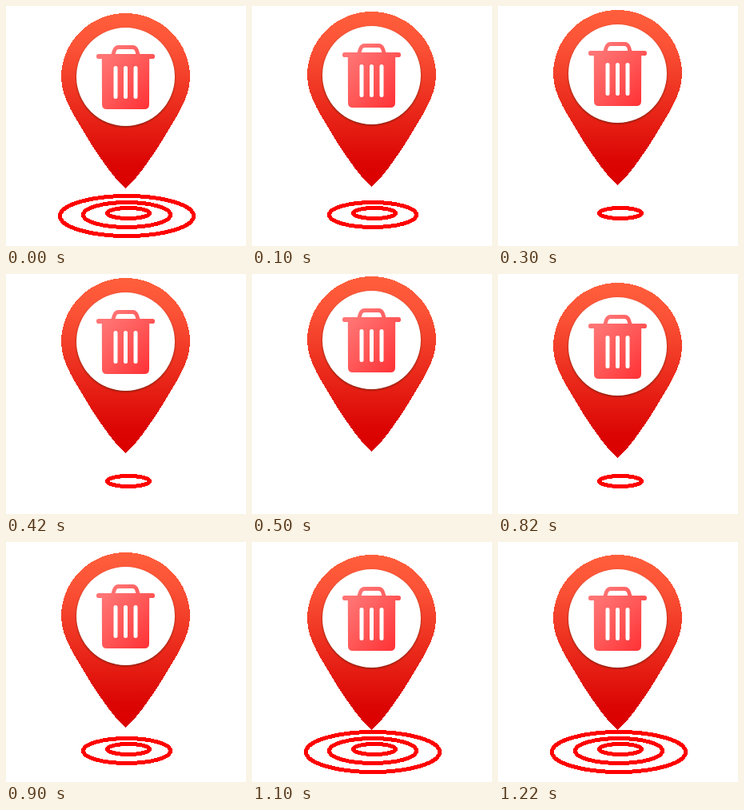
Write an HTML page that moves like this. It is 300x300 px and loops after 1300 ms.

```html
<!DOCTYPE html>
<html lang="en">
<head>
<meta charset="utf-8">
<title>Bin location pin</title>
<style>
  html, body { margin: 0; width: 100%; height: 100%; overflow: hidden; background: #fff; }
  svg { display: block; width: 300px; height: 300px; }
  .ring { fill: none; stroke: #f00; stroke-width: 5; shape-rendering: crispEdges; }
</style>
</head>
<body>
<svg viewBox="0 0 300 300">
  <defs>
    <linearGradient id="red" x1="0" y1="0" x2="0" y2="1">
      <stop offset="0" stop-color="#ff5f3c"/>
      <stop offset=".2" stop-color="#fb5236"/>
      <stop offset=".87" stop-color="#db0503"/>
      <stop offset="1" stop-color="#dc0000"/>
    </linearGradient>
    <linearGradient id="pink" gradientUnits="userSpaceOnUse" x1="116" y1="72" x2="176" y2="126">
      <stop offset="0" stop-color="#ff7474"/>
      <stop offset=".5" stop-color="#ff5757"/>
      <stop offset="1" stop-color="#ff3438"/>
    </linearGradient>
    <filter id="soft" x="-10%" y="-10%" width="120%" height="120%">
      <feGaussianBlur stdDeviation="1.2"/>
    </filter>
  </defs>

  <ellipse class="ring" cx="151" cy="262.5" rx="83.5" ry="25"/>
  <ellipse class="ring" cx="151" cy="261" rx="54.5" ry="15.5"/>
  <ellipse class="ring" cx="153" cy="259" rx="26.5" ry="6.5"/>

  <g id="pin">
    <path fill="url(#red)" shape-rendering="crispEdges"
      d="M149.5 9C194 9 230 45 230 89C230 116 211 141 193.500 171C178 195 164 215 151 227Q149.500 228.500 148 227C135 215 121 195 105.500 171C88 141 69 116 69 89C69 45 105 9 149.500 9Z"/>
    <circle cx="149.500" cy="89.700" r="61.500" fill="#6b2410" opacity=".8" filter="url(#soft)"/>
    <circle cx="149.500" cy="88.500" r="61.500" fill="#fff"/>
    <path d="M133.500 62L135.500 55.500Q137 51.500 141 51.500H158Q162 51.500 163.500 55.500L165.500 62"
      fill="none" stroke="url(#pink)" stroke-width="4.800"/>
    <rect x="113" y="60" width="73" height="6" rx="2.800" fill="url(#pink)"/>
    <path d="M119.800 65H179.200L179 123Q179 129 173 129H126Q120 129 120 123Z" fill="url(#pink)"/>
    <path d="M137 77.500V113.500M149.500 77.500V113.500M162 77.500V113.500"
      stroke="#fff" stroke-width="5" stroke-linecap="round"/>
  </g>
</svg>
<script>
  // end time (ms), pin offset (px), rings shown
  const steps = [
    [100, 0, 3],
    [300, -2, 2],
    [500, -4, 1],
    [700, -6, 0],
    [900, 2, 1],
    [1100, 4, 2],
    [1300, 7, 3]
  ];
  const loop = 1300;
  const pin = document.getElementById('pin');
  const rings = [...document.querySelectorAll('.ring')].reverse();
  const start = performance.now();

  function draw() {
    const t = (performance.now() - start) % loop;
    const [, dy, count] = steps.find(([end]) => t < end);
    pin.setAttribute('transform', `translate(0 ${dy})`);
    rings.forEach((ring, i) => ring.setAttribute('visibility', i < count ? 'visible' : 'hidden'));
    requestAnimationFrame(draw);
  }
  draw();
</script>
</body>
</html>
```
